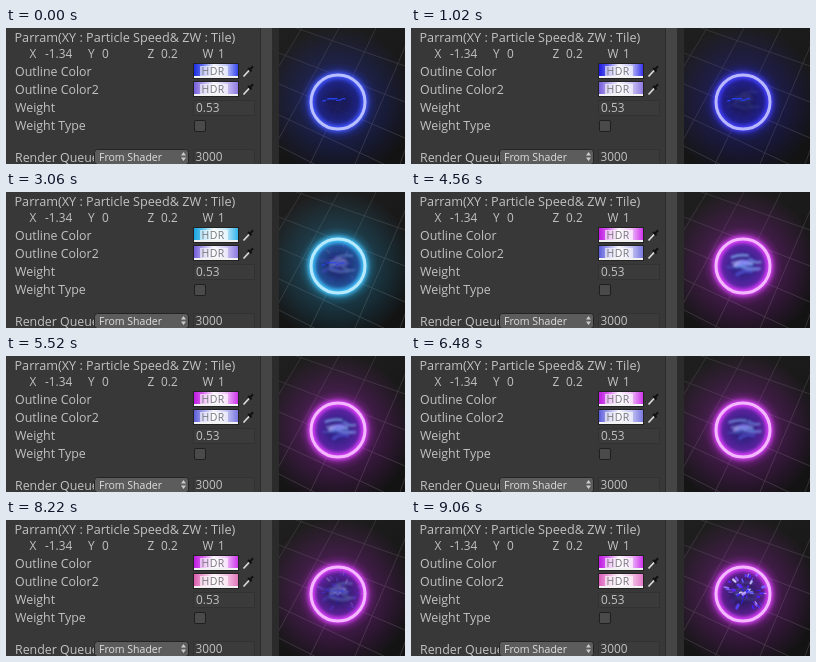
These frames come from a looping animation (399 by 136 pixels, 9.12 s). An HTML page:

```html
<!DOCTYPE html>
<html lang="en">
<head>
<meta charset="utf-8">
<title>Particle sphere inspector</title>
<style>
html, body { margin: 0; width: 100%; height: 100%; overflow: hidden; background: #383838; }
svg { display: block; width: 399px; height: 136px; }
text { font: 12.4px "Open Sans", "Noto Sans", sans-serif; fill: #c2c2c2; }
.title { font-size: 12.65px; }
.value { font-size: 11.8px; }
.menu { font-size: 10.5px; fill: #dedede; }
.hdr { font-size: 10.5px; fill: #77777c; letter-spacing: .4px; }
</style>
</head>
<body>
<svg id="stage" viewBox="0 0 399 136">
  <defs>
    <linearGradient id="floor" x1="0" y1="0" x2=".4" y2="1">
      <stop offset="0" stop-color="#201f1f"/><stop offset="1" stop-color="#131313"/>
    </linearGradient>
    <radialGradient id="halo">
      <stop class="glow" offset="0" stop-opacity=".12"/>
      <stop class="glow" offset=".36" stop-opacity=".5"/>
      <stop class="glow" offset=".52" stop-opacity=".2"/>
      <stop class="glow" offset="1" stop-opacity="0"/>
    </radialGradient>
    <radialGradient id="fresnel">
      <stop class="glow" offset=".35" stop-opacity=".08"/>
      <stop class="glow" offset=".75" stop-opacity=".28"/>
      <stop class="glow" offset="1" stop-opacity=".75"/>
    </radialGradient>
    <filter id="soft" x="-40%" y="-40%" width="180%" height="180%"><feGaussianBlur stdDeviation="2.2"/></filter>
    <filter id="wisp" x="-40%" y="-40%" width="180%" height="180%"><feGaussianBlur stdDeviation="1.1"/></filter>
    <filter id="fine" x="-40%" y="-40%" width="180%" height="180%"><feGaussianBlur stdDeviation=".6"/></filter>
    <clipPath id="view"><rect x="273" width="126" height="136"/></clipPath>
    <clipPath id="ball"><circle cx="332" cy="74" r="27"/></clipPath>
    <clipPath id="queue"><rect width="88" height="136"/></clipPath>
  </defs>
  <rect width="399" height="136" fill="#383838"/>
  <g id="panel"></g>
  <rect x="254" width="1" height="136" fill="#2c2c2c"/>
  <rect x="255" width="11" height="136" fill="#454545"/>
  <rect x="266" width="7" height="136" fill="#2b2b2b"/>
  <g clip-path="url(#view)">
    <rect x="273" width="126" height="136" fill="url(#floor)"/>
    <g id="grid" stroke="#343333" stroke-width="1"></g>
    <circle cx="332" cy="74" r="76" fill="url(#halo)"/>
    <circle cx="332" cy="74" r="27" fill="#100e24" opacity=".7"/>
    <g clip-path="url(#ball)">
      <circle id="fog" cx="332" cy="74" r="27" fill="hsl(240 60% 42%)"/>
      <circle cx="332" cy="74" r="27" fill="url(#fresnel)"/>
      <g id="swirl" fill="none" stroke-linecap="round" filter="url(#wisp)"></g>
      <g id="burst" stroke-linecap="round" filter="url(#fine)"></g>
      <g id="dashes" stroke-linecap="round" stroke-width="1.4"></g>
    </g>
    <g fill="none">
      <circle id="aura" cx="332" cy="74" r="27" stroke-width="6" filter="url(#soft)"/>
      <circle id="rim" cx="332" cy="74" r="27" stroke-width="3" filter="url(#fine)"/>
    </g>
  </g>
</svg>
<script>
const LOOP = 9120, STEP = 60, CYCLE = 1040;
const CX = 332, CY = 74;
const NS = "http://www.w3.org/2000/svg";
const get = id => document.getElementById(id);
const set = (el, attrs) => { for (const name in attrs) el.setAttribute(name, attrs[name]); };

function add(parent, tag, attrs, content) {
  const el = document.createElementNS(NS, tag);
  set(el, attrs);
  if (content) el.textContent = content;
  parent.append(el);
  return el;
}
const panel = get("panel");
const label = (x, y, content, more = {}) => add(panel, "text", { x, y, ...more }, content);
const box = (x, y, width, height, fill, stroke = "#262626", rx = 0) =>
  add(panel, "rect", { x, y, width, height, fill, stroke, rx });

label(8.5, 14, "Parram(XY : Particle Speed& ZW : Tile)", { class: "title" });
[["X", 23.5, "-1.34", 39], ["Y", 82, "0", 96], ["Z", 141.5, "0.2", 155], ["W", 196.5, "1", 212]]
  .forEach(([axis, x, value, vx]) => {
    label(x, 29.5, axis, { class: "value" });
    label(vx, 29.5, value, { class: "value" });
  });
label(9, 47.5, "Outline Color");
label(9, 65.5, "Outline Color2");
label(9, 83.5, "Weight");
label(9, 101.5, "Weight Type");
label(9, 133.5, "Render Queue", { "clip-path": "url(#queue)" });

box(187.5, 72.5, 61, 15, "#3b3b3b", "#323232");
label(190, 83.5, "0.53", { class: "value" });
box(188.5, 92.5, 11, 11, "#4a4a4a", "#1f1f1f", 1.5);
box(88.5, 121.5, 94, 15, "#5c5c5c", "#242424", 3);
label(93, 132.5, "From Shader", { class: "menu" });
add(panel, "path", { d: "M175 127.5l2.5-3.5 2.5 3.5zM175 129.5l2.5 3.5 2.5-3.5z", fill: "#ccc" });
box(187.5, 121.5, 61, 15, "#3b3b3b", "#323232");
label(189.5, 133, "3000", { class: "value" });

function swatch(id, y, saturation, shade) {
  const gradient = add(panel, "linearGradient", { id });
  const stops = [0, .2, .45, .72, 1].map(offset => add(gradient, "stop", { offset }));
  box(187.5, y - .5, 45, 15, `url(#${id})`, "#222");
  add(panel, "rect", { x: 188, y: y + 12, width: 44, height: 2, fill: "#f2f2f2" });
  add(panel, "rect", { x: 194, y: y + 2, width: 28, height: 10, fill: "#fff", opacity: .6 });
  label(195.5, y + 11, "HDR", { class: "hdr" });
  add(panel, "path", { d: `M237.5 ${y + 12.5}l6-6.5`, stroke: "#dcdcdc", "stroke-width": 1.7 });
  add(panel, "path", { d: `M242 ${y + 4}l3.5 3.5M244 ${y + 5.5}l3-3.2`, stroke: "#111", "stroke-width": 2 });
  return hue => stops.forEach((stop, i) =>
    stop.setAttribute("stop-color", `hsl(${hue} ${saturation}% ${[shade, shade + 17, 98, 87, shade + 7][i]}%)`));
}
const paintOutline = swatch("outlineFill", 36, 82, 48);
const paintInner = swatch("innerFill", 54, 64, 60);

// Floor lines in two perspective families
for (let i = 0; i < 6; i++) {
  add(get("grid"), "line", { x1: 296 + i * 37, y1: 0, x2: 214 + i * 45, y2: 136 });
  add(get("grid"), "line", { x1: 273, y1: -6 + i * 31, x2: 399, y2: 38 + i * 36 });
}

const noise = n => { const v = Math.sin(n * 127.1 + 3.7) * 43758.5453; return v - Math.floor(v); };
const make = (id, tag, count) => Array.from({ length: count }, () => add(get(id), tag, {}));
const sparks = make("burst", "line", 48);
const wisps = make("swirl", "path", 16);
const dashes = make("dashes", "line", 5);

// Eased interpolation through [time, value] pairs
function track(keys, t) {
  const i = keys.findIndex(key => key[0] > t);
  if (i < 0) return keys[keys.length - 1][1];
  if (i === 0) return keys[0][1];
  const [t0, a] = keys[i - 1], [t1, b] = keys[i];
  const u = (t - t0) / (t1 - t0);
  return a + (b - a) * u * u * (3 - 2 * u);
}
const outlineHue = [[900, 234], [1860, 394], [1980, 394], [2880, 558], [3060, 558], [3840, 650]];
const innerHue = [[2940, 252], [3840, 240], [6720, 240], [7320, 328], [7740, 328], [8640, 315]];
const dashLevel = [[0, 1], [60, 1], [200, 0], [880, 0], [1040, 1]];
const swirlLevel = [[40, 0], [240, .85], [400, 1], [640, .3], [820, .2], [980, .55], [1040, 0]];
const burstLevel = [[480, 0], [700, 1], [840, 1], [980, .1], [1040, 0]];

function drawBurst(phase) {
  const spread = .55 + .5 * phase / CYCLE;
  sparks.forEach((spark, i) => {
    const angle = noise(i) * Math.PI * 2;
    const r = noise(i + 60) * 22 * spread;
    const end = r + 1 + noise(i + 120) * 3;
    const dx = Math.cos(angle), dy = Math.sin(angle);
    set(spark, {
      x1: CX + 3 + dx * r, y1: CY - 2 + dy * r, x2: CX + 3 + dx * end, y2: CY - 2 + dy * end,
      "stroke-width": .8 + noise(i + 180) * 2,
      stroke: `hsl(${242 + noise(i + 240) * 20} 92% ${54 + noise(i + 300) ** 3 * 38}%)`
    });
  });
}

function drawSwirl(phase) {
  const turn = phase / CYCLE * 1.6;
  wisps.forEach((wisp, i) => {
    const angle = noise(i + 40) * Math.PI * 2 + turn;
    const reach = noise(i + 70) * 14;
    const x = CX + 1 + Math.cos(angle) * reach, y = CY - 2 + Math.sin(angle) * reach * .8;
    const length = 3 + noise(i + 90) * 6, bend = (noise(i + 110) - .5) * 8;
    set(wisp, {
      d: `M${x - length} ${y + bend / 2}Q${x} ${y - bend} ${x + length} ${y - bend / 3}`,
      stroke: `hsl(${212 + noise(i) * 38} 85% ${62 + noise(i + 30) * 24}%)`,
      "stroke-width": 1 + noise(i + 9) * 2.6, opacity: .35 + noise(i + 20) * .4
    });
  });
}

function drawDashes(phase) {
  const drift = phase < CYCLE / 2 ? phase : phase - CYCLE;
  dashes.forEach((dash, i) => {
    const x = CX - 15 + i * 4.6 + drift * .012, y = CY - 3 + noise(i + 4) * 4;
    set(dash, { x1: x, y1: y, x2: x + 2 + noise(i) * 3, y2: y - .5, stroke: "hsl(232 90% 55%)" });
  });
}

const glowStops = document.querySelectorAll(".glow");

function draw(time) {
  const t = Math.floor(time % LOOP / STEP) * STEP;
  const phase = t % CYCLE;
  const hue = track(outlineHue, t);
  const swirl = track(swirlLevel, phase);
  paintOutline(hue);
  paintInner(track(innerHue, t));
  glowStops.forEach(stop => stop.setAttribute("stop-color", `hsl(${hue} 90% 56%)`));
  get("aura").setAttribute("stroke", `hsl(${hue} 100% 64%)`);
  get("rim").setAttribute("stroke", `hsl(${hue} 100% 86%)`);
  get("fog").setAttribute("opacity", .25 + swirl * .4);
  get("swirl").setAttribute("opacity", swirl);
  get("burst").setAttribute("opacity", track(burstLevel, phase));
  get("dashes").setAttribute("opacity", track(dashLevel, phase));
  drawBurst(phase);
  drawSwirl(phase);
  drawDashes(phase);
}

const start = performance.now();
function tick() {
  draw(performance.now() - start);
  requestAnimationFrame(tick);
}
draw(0);
tick();
</script>
</body>
</html>
```
